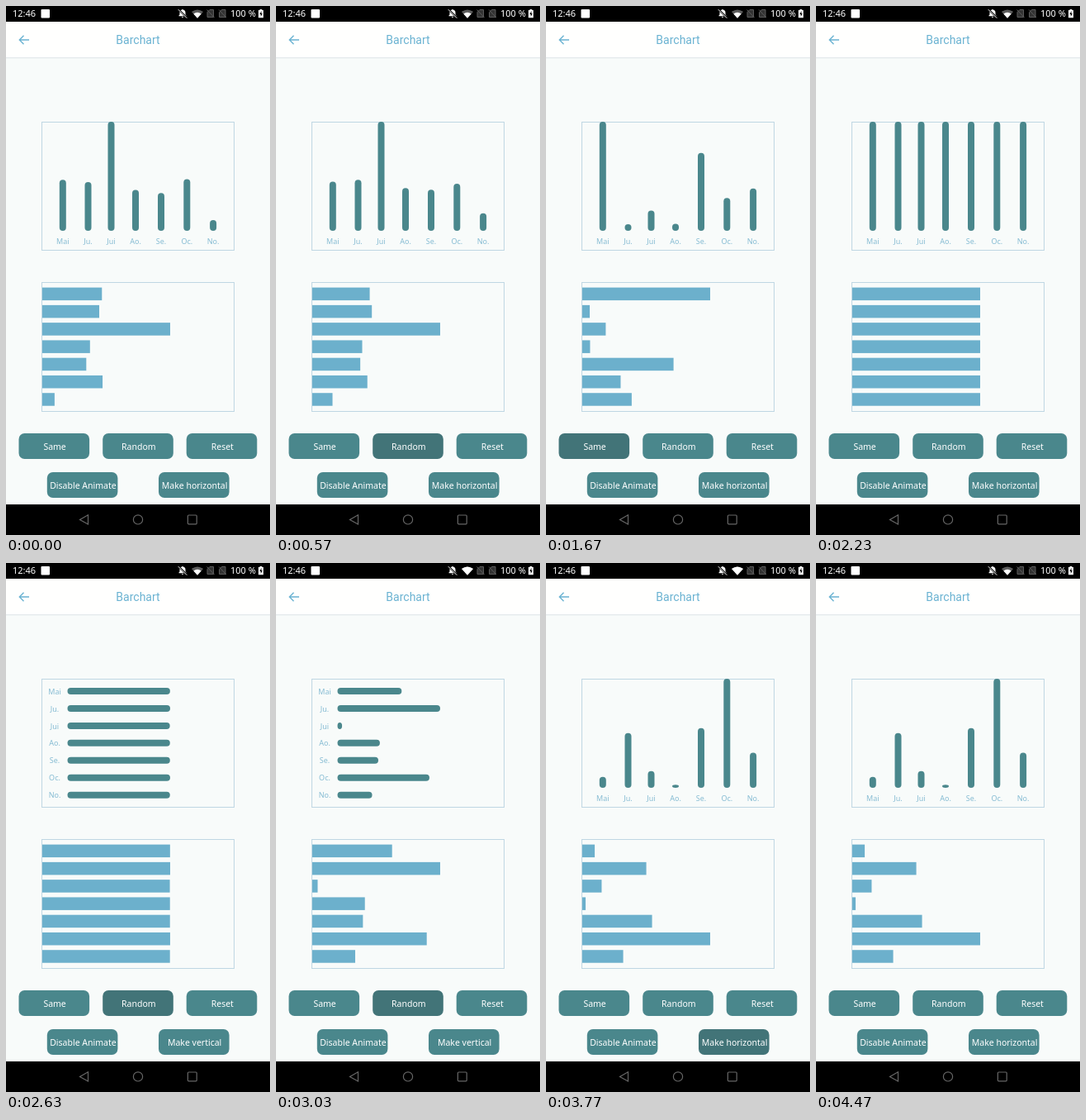
An HTML page that plays this animation: 320x640 px, repeating every 4560 ms.

```html
<!DOCTYPE html>
<html lang="en">
<head>
<meta charset="utf-8">
<title>Barchart</title>
<style>
html, body { margin: 0; width: 100%; height: 100%; overflow: hidden; background: #f8fbfa; }
svg { display: block; width: 320px; height: 640px; }
text { font-family: "Noto Sans", sans-serif; text-anchor: middle; }
.status text { font-size: 11px; fill: #fff; text-anchor: start; }
.title { font-family: Roboto, sans-serif; font-size: 14px; fill: #6bb3d2; }
.label { font-size: 9px; fill: #86bcd3; }
.caption { font-size: 10.5px; fill: #fff; }
.frame { fill: none; stroke: #bfd7e3; }
.bar { fill: #4a878c; }
.row { fill: #6cb0cc; }
.nav { fill: none; stroke: #666; stroke-width: 1.2; }
</style>
</head>
<body>
<svg id="stage" viewBox="0 0 320 640">
  <rect width="320" height="640" fill="#f8fbfa"/>
  <rect y="62" width="320" height="1" fill="#e4eaec"/>
  <rect y="63" width="320" height="1" fill="#f1f5f5"/>
  <rect y="19" width="320" height="43" fill="#fffffe"/>
  <rect width="320" height="19"/>
  <rect y="603" width="320" height="37"/>

  <g class="status">
    <text x="8" y="13.3">12:46</text>
    <text x="272" y="13.3">100 %</text>
    <rect x="42.5" y="4" width="10.5" height="10.5" rx="1" fill="#fff"/>
    <path d="M209.5 12.3V11.5L210.5 10.5V8Q210.5 5 213.3 4.5Q214 3 214.7 4.5Q217.5 5 217.5 8V10.5L218.5 11.5V12.3ZM212.8 13H215.2Q214 15 212.8 13Z" fill="#fff"/>
    <path d="M209 4L219.5 14.5" stroke="#000" stroke-width="2.2"/>
    <path d="M208.8 4.2L219.2 14.6" stroke="#fff"/>
    <path d="M225 7Q232 1.8 239 7L232 14.8Z" fill="#5c5c5c"/>
    <path id="wifi" fill="#fff"/>
    <g fill="#333" stroke="#5c5c5c">
      <path d="M244 13.5V7.5L247 4.5H251.5V13.5ZM243.5 4.5L252.5 14"/>
      <path d="M258.5 13.5V7.5L261.5 4.5H266V13.5ZM258 4.5L267 14"/>
    </g>
    <path d="M307.6 4H310.4V5H312V14.3H306V5H307.6Z" fill="#fff"/>
    <path d="M309.6 6L307.4 10H308.8V13L310.8 9H309.5Z"/>
  </g>

  <path d="M28 41H16.5M21.5 35.8L16.3 41L21.5 46.2" fill="none" stroke="#6bb3d2" stroke-width="1.4"/>
  <text class="title" x="160" y="46">Barchart</text>
  <rect class="frame" x="43.5" y="140.5" width="233" height="155"/>
  <g id="charts"></g>
  <rect class="frame" x="43.5" y="334.5" width="233" height="156"/>
  <g id="buttons"></g>

  <g class="nav">
    <path d="M99.5 615.8V627L89.5 621.4Z"/>
    <circle cx="160" cy="621.4" r="5.6"/>
    <rect x="220.4" y="616" width="10.8" height="10.8" rx="1"/>
  </g>
</svg>
<script>
const LOOP = 4560;
const MONTHS = ["Mai", "Ju.", "Jui", "Ao.", "Se.", "Oc.", "No."];
const COLUMNS = [68.8, 99.5, 127.5, 157, 188, 219.3, 251.1];
const START = [.468, .447, 1, .375, .346, .473, .099];
const SAME = MONTHS.map(() => 1);

// Each tap: time, button index and, for data buttons, the values it leads to
const TAPS = [
  { at: 466, button: 1, data: [.266, .685, 1, .576, .71, 0, .82] },
  { at: 900, button: 1, data: [.468, .392, 1, .31, .78, .058, .228] },
  { at: 1270, button: 1, data: [1, .03, .159, .033, .705, .279, .368] },
  { at: 1580, button: 0, data: SAME },
  { at: 2230, button: 4 },
  { at: 2560, button: 1, data: [.65, 1, .04, .42, .4, .9, .35] },
  { at: 2935, button: 1, data: [.123, 1, .144, .273, .353, .8, .088] },
  { at: 3303, button: 1, data: [.1, .502, .154, .029, .547, 1, .322] },
  { at: 3670, button: 4 }
];
const DELAY = 55, DURATION = 180;
const PRESS = 50, RELEASE = 105, FADE = 100;
const UP = [74, 135, 140], DOWN = [66, 116, 120];

const clamp = v => Math.max(0, Math.min(1, v));
const ease = u => u < .5 ? 4 * u ** 3 : 1 - 4 * (1 - u) ** 3;
const $ = id => document.getElementById(id);

function set(el, attrs) {
  for (const key in attrs) el.setAttribute(key, attrs[key]);
}

function add(parent, tag, attrs, text = "") {
  const el = document.createElementNS("http://www.w3.org/2000/svg", tag);
  set(el, attrs);
  el.textContent = text;
  return parent.appendChild(el);
}

const charts = $("charts");
const bars = MONTHS.map(() => add(charts, "rect", { class: "bar", rx: 4 }));
const labels = MONTHS.map(name => add(charts, "text", { class: "label" }, name));
const rows = MONTHS.map((_, i) =>
  add(charts, "rect", { class: "row", x: 43.5, y: 340.6 + 21.27 * i, height: 15.5 }));

const buttons = [
  ["Same", 15.5, 517], ["Random", 117.2, 517], ["Reset", 218.7, 517],
  ["Disable Animate", 49.8, 564], ["Make horizontal", 185, 564]
].map(([name, x, y]) => ({
  box: add($("buttons"), "rect", { x, y, width: 85.6, height: 31, rx: 7 }),
  caption: add($("buttons"), "text", { class: "caption", x: x + 43.6, y: y + 19.8 }, name)
}));

function valuesAt(t) {
  let values = START;
  for (const { at, data } of TAPS) {
    if (!data) continue;
    const p = ease(clamp((t - at - DELAY) / DURATION));
    values = values.map((v, i) => v + (data[i] - v) * p);
  }
  return values;
}

function pressAt(t, button) {
  return Math.max(0, ...TAPS.filter(tap => tap.button === button).map(({ at }) =>
    Math.min(clamp((t - at) / PRESS), clamp(1 - (t - at - RELEASE) / FADE))));
}

function draw(t) {
  const values = valuesAt(t);
  const toggles = TAPS.filter(tap => !tap.data && t >= tap.at + DELAY).length;
  const horizontal = toggles % 2 === 1;

  values.forEach((v, i) => {
    const y = 155 + 20.95 * i, x = COLUMNS[i];
    if (horizontal) {
      set(bars[i], { x: 74.5, y: y - 4, width: 124.5 * v, height: 8 });
      set(labels[i], { x: 59, y: y + 3.6 });
    } else {
      set(bars[i], { x: x - 4, y: 272 - 132 * v, width: 8, height: 132 * v });
      set(labels[i], { x, y: 287.6 });
    }
    set(rows[i], { width: 155.5 * v });
  });

  buttons.forEach(({ box }, i) => {
    const p = pressAt(t, i);
    set(box, { fill: `rgb(${UP.map((c, k) => Math.round(c + (DOWN[k] - c) * p))})` });
  });
  const name = horizontal ? "Make vertical" : "Make horizontal";
  if (buttons[4].caption.textContent !== name) buttons[4].caption.textContent = name;

  const strong = t >= 2900 && t < 4470;
  set($("wifi"), { d: strong ? "M225 7Q232 1.8 239 7L232 14.8Z" : "M227.3 9.5Q232 6.2 236.7 9.5L232 14.8Z" });
}

const begin = performance.now();
function tick() {
  draw((performance.now() - begin) % LOOP);
  requestAnimationFrame(tick);
}
tick();
</script>
</body>
</html>
```
